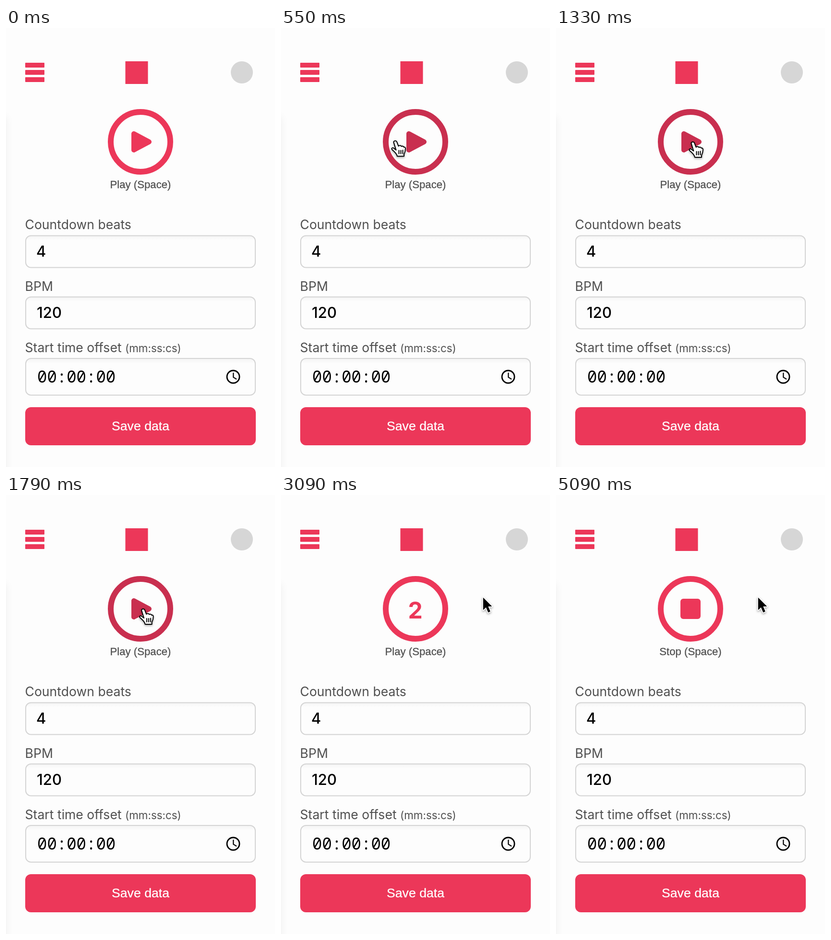
An HTML page that plays this animation: 560x910 px, repeating every 5270 ms.

```html
<!DOCTYPE html>
<html lang="en">
<head>
<meta charset="utf-8">
<title>Countdown player</title>
<style>
html, body { margin: 0; width: 100%; height: 100%; overflow: hidden; background: #fdfdfd; }
svg { display: block; width: 560px; height: 910px; }
text { white-space: pre; }
.label { font: 26.6px Inter, sans-serif; fill: #505050; }
.small { font-size: 22.4px; }
.value { font: 500 31px Inter, sans-serif; fill: #000; }
.time { font: 500 34px "Noto Sans Mono", monospace; fill: #000; }
.caption { font: 22.2px "Liberation Sans", Arial, sans-serif; fill: #505050; stroke: #505050; stroke-width: .3; text-anchor: middle; }
.save { font: 26.67px "Liberation Sans", Arial, sans-serif; fill: #fff; stroke: #fff; stroke-width: .3; text-anchor: middle; }
.count { font: 700 48px Inter, sans-serif; text-anchor: middle; }
.field { fill: url(#inset); stroke: #d4d4d4; stroke-width: 2; }
.cursor { filter: drop-shadow(0 2px 2px rgba(0,0,0,.35)); }
</style>
</head>
<body>
<svg viewBox="0 0 560 910">
  <defs>
    <linearGradient id="inset" x2="0" y2="1">
      <stop offset="0" stop-color="#f4f4f4"/>
      <stop offset=".14" stop-color="#fdfdfd"/>
    </linearGradient>
    <filter id="soft" x="-40" y="130" width="100" height="820" filterUnits="userSpaceOnUse">
      <feGaussianBlur stdDeviation="9"/>
    </filter>
  </defs>
  <rect width="560" height="910" fill="#fdfdfd"/>
  <rect x="-30" y="184" width="30" height="760" fill="#000" opacity=".06" filter="url(#soft)"/>

  <g fill="#ec3759">
    <rect x="40" y="72" width="40" height="10" rx="1"/>
    <rect x="40" y="87" width="40" height="10" rx="1"/>
    <rect x="40" y="102" width="40" height="10" rx="1"/>
    <rect x="248.5" y="69" width="47" height="47"/>
    <rect x="40" y="786" width="480" height="79" rx="12"/>
  </g>
  <circle cx="491" cy="92" r="23" fill="#d6d6d6"/>

  <g id="button">
    <circle cx="280" cy="236" r="62" fill="none" stroke="currentColor" stroke-width="12"/>
    <path id="play" d="M266 219V253L298 236Z" fill="currentColor" stroke="currentColor" stroke-width="10" stroke-linejoin="round"/>
    <text id="count" class="count" x="279.5" y="256" fill="currentColor"></text>
    <rect id="stop" x="259" y="215" width="42" height="42" rx="6" fill="currentColor"/>
  </g>
  <text id="caption" class="caption" x="280" y="332"></text>

  <text class="label" x="39.5" y="417">Countdown beats</text>
  <rect class="field" x="41" y="430.5" width="478" height="66" rx="11"/>
  <text class="value" x="63" y="474">4</text>

  <text class="label" x="39.5" y="545">BPM</text>
  <rect class="field" x="41" y="557.5" width="478" height="66" rx="11"/>
  <text class="value" x="64" y="601">120</text>

  <text class="label" x="39.5" y="672">Start time offset <tspan class="small">(mm:ss:cs)</tspan></text>
  <rect class="field" x="41" y="685" width="478" height="76" rx="11"/>
  <text class="time" x="65" y="735">00:00:00</text>
  <g fill="none" stroke="#000">
    <circle cx="473" cy="723" r="13" stroke-width="2.8"/>
    <path d="M473.3 714.5V724L480 728" stroke-width="2.2"/>
  </g>
  <text class="save" x="280" y="833.5">Save data</text>

  <g id="cursor" class="cursor">
    <path id="arrow" d="M.8 1.5v26l6-5.5 4.5 10.5 4.5-2-4.5-10.5h8z" fill="#000" stroke="#fff" stroke-width="3.4" stroke-linejoin="round" paint-order="stroke"/>
    <g id="hand" transform="translate(1.5 0)" stroke="#000" stroke-width="2" stroke-linecap="round" stroke-linejoin="round">
      <path fill="#fff" d="M-3 2C-3-1 2-2 3.5 1L7 10C9 8 12 8.5 13 10.5C15 9.5 17 10 18 12C20 11.5 21.5 12.5 21.5 15C21.5 20 20 24 18.5 27V31H4.5L3.5 28C1 23-3 20-6.5 17C-8 14-5 12-2 15L2 18Z"/>
      <path fill="none" d="M8 19V26M12 19V26M16 18.5V26"/>
    </g>
  </g>
</svg>
<script>
const LOOP = 5270, ENTER = 30, STOP = 4270;
const BEATS = [2000, 2760, 3270, 3760];

const $ = id => document.getElementById(id);
const show = (id, on) => $(id).setAttribute('display', on ? 'inline' : 'none');
const linear = u => u;
const easeOut = u => 1 - (1 - u) * (1 - u);
const easeInOut = u => u * u * (3 - 2 * u);

// Pointer route: time, x, y, easing used to arrive there
const route = [
  [30, -4, 440, linear],
  [360, 127, 333, linear],
  [760, 277, 198, easeOut],
  [940, 278, 198, linear],
  [1330, 283, 237, easeInOut],
  [2020, 284, 237, linear],
  [2240, 392, 212, linear],
  [2550, 420, 211, easeOut]
];

function pointer(t) {
  const i = route.findIndex(p => p[0] > t);
  if (i < 0) return route[route.length - 1].slice(1, 3);
  if (i === 0) return route[0].slice(1, 3);
  const [t0, x0, y0] = route[i - 1], [t1, x1, y1, ease] = route[i];
  const u = ease((t - t0) / (t1 - t0));
  return [x0 + (x1 - x0) * u, y0 + (y1 - y0) * u];
}

function draw(t) {
  const [x, y] = pointer(t);
  const hover = Math.hypot(x - 280, y - 236) < 68;
  const beat = BEATS.filter(b => t >= b).length;
  const playing = t >= STOP;

  show('cursor', t >= ENTER);
  show('arrow', !hover);
  show('hand', hover);
  $('cursor').setAttribute('transform', `translate(${x.toFixed(2)} ${y.toFixed(2)})`);

  $('button').setAttribute('color', hover ? '#c92f4f' : '#ec3759');
  show('play', beat === 0);
  show('stop', playing);
  $('count').textContent = beat && !playing ? beat : '';
  $('caption').textContent = (playing ? 'Stop' : 'Play') + ' (Space)';
}

const start = performance.now();
function tick() {
  draw((performance.now() - start) % LOOP);
  requestAnimationFrame(tick);
}
draw(0);
requestAnimationFrame(tick);
</script>
</body>
</html>
```
